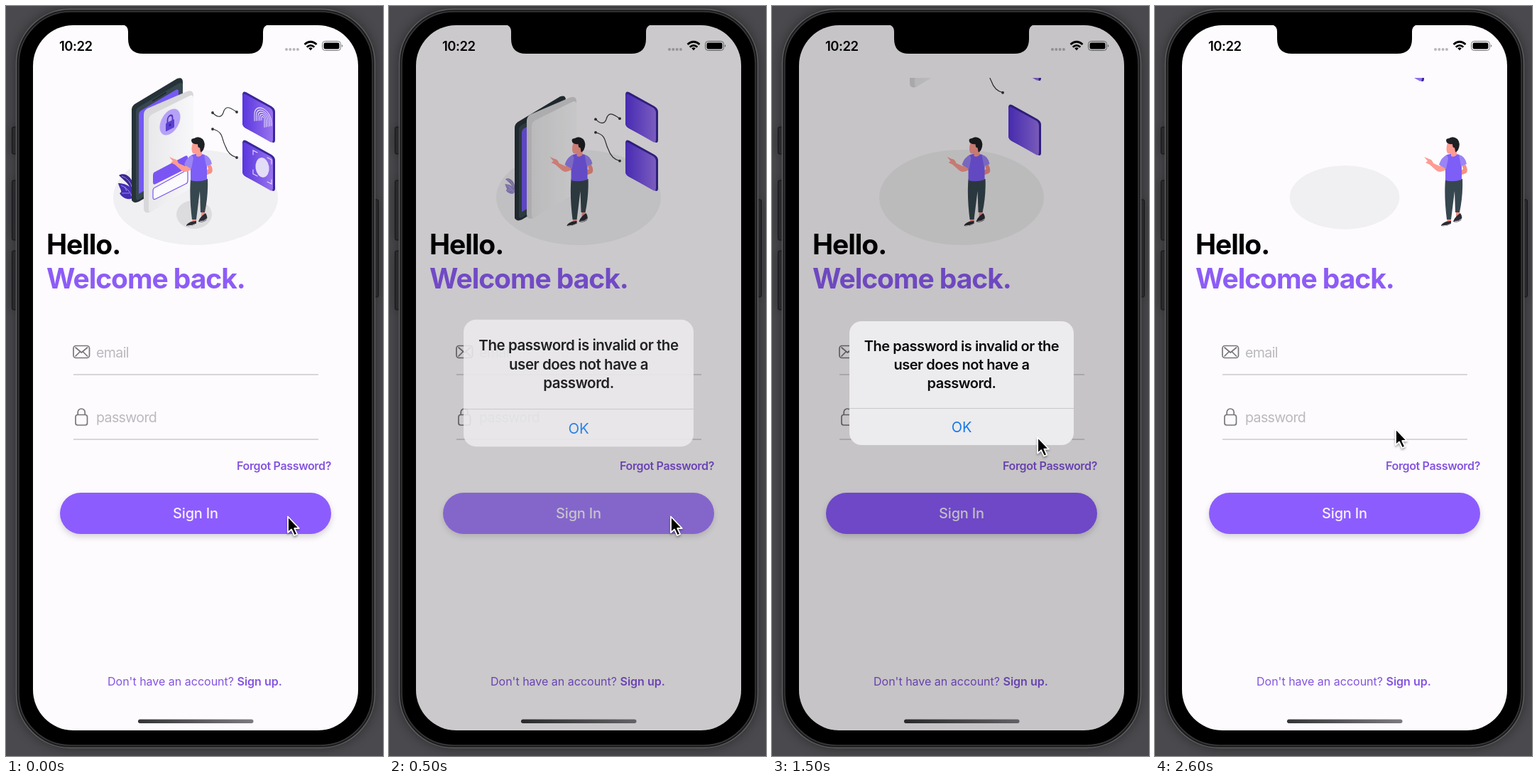
Write an HTML page that moves like this. It is 531x1054 px and loops after 2.7 s.

```html
<!DOCTYPE html>
<html lang="en">
<head>
<meta charset="utf-8">
<title>Sign in</title>
<style>
html, body { margin: 0; width: 100%; height: 100%; overflow: hidden; background: #4a494d; }
svg { display: block; width: 100vw; height: 100vh; }
text { font-family: Inter, Roboto, sans-serif; }
.mid { text-anchor: middle; }
.title { font-size: 39px; font-weight: 700; letter-spacing: -1.05px; }
.hint { font-size: 19.6px; letter-spacing: -.65px; fill: #bbb9be; }
.small { font-size: 16px; fill: #8454df; }
.bold { font-weight: 600; }
.msg { font-size: 20px; font-weight: 600; letter-spacing: -.45px; fill: #0b0b0d; }
.icon { fill: none; stroke: #77767b; stroke-width: 1.7; stroke-linejoin: round; stroke-linecap: round; }
.rule { stroke: #b3b1b6; }
.wire { fill: none; stroke: #34343c; stroke-width: 1.2; }
#body { filter: drop-shadow(0 0 8px rgba(0, 0, 0, .4)); }
#button { filter: drop-shadow(0 4px 4px rgba(0, 0, 0, .16)); }
#cursor { filter: drop-shadow(0 2px 1.5px rgba(0, 0, 0, .35)); }
</style>
</head>
<body>
<svg viewBox="0 0 531 1054" preserveAspectRatio="none">
  <defs>
    <linearGradient id="violet">
      <stop offset="0" stop-color="#5936df"/><stop offset="1" stop-color="#9973ee"/>
    </linearGradient>
    <linearGradient id="glass">
      <stop offset="0" stop-color="#e9e8ea"/><stop offset="1" stop-color="#f8f7f9"/>
    </linearGradient>
    <linearGradient id="bar">
      <stop offset="0" stop-color="#343336"/><stop offset="1" stop-color="#7c7a7f"/>
    </linearGradient>
    <clipPath id="screen"><rect x="38" y="27" width="458" height="991" rx="57"/></clipPath>
    <clipPath id="view"><rect x="38" y="101" width="458" height="240"/></clipPath>
    <g id="card">
      <path fill="#3a279c" d="M333 125Q333 119 338 121L374 141Q379 144 379 149V188Q379 194 374 191L338 172Q333 169 333 164z"/>
      <path fill="url(#violet)" d="M333 127Q333 122 337 124L372 143Q376 146 376 150V187Q376 193 372 191L337 171Q333 169 333 165z"/>
    </g>
  </defs>

  <g id="body">
    <g fill="#29292b" stroke="#151516">
      <rect x="8.5" y="170" width="9" height="38" rx="2"/>
      <rect x="8.5" y="245" width="9" height="84" rx="2"/>
      <rect x="8.5" y="344" width="9" height="83" rx="2"/>
      <rect x="516" y="272" width="8.5" height="137" rx="2"/>
    </g>
    <rect x="14.5" y="4.5" width="505" height="1038" rx="76" fill="#1c1c1d" stroke="#5e5d61" stroke-width="1.5"/>
  </g>
  <rect x="18" y="8" width="498" height="1031" rx="73" stroke="#39393b" stroke-width="1.5"/>

  <g clip-path="url(#screen)">
    <rect x="38" y="27" width="458" height="991" fill="#fdfbfe"/>

    <g clip-path="url(#view)">
      <ellipse id="floor" cx="267" cy="269" rx="116" ry="67" fill="#f0eff1"/>
      <ellipse id="shade" cx="265" cy="293" rx="25" ry="20" fill="#dcdbde"/>

      <g id="plant">
        <path fill="#3a2891" d="M159 238C168 232 182 243 181 262L176 263C176 251 168 247 159 238z"/>
        <path fill="#452db5" d="M158 249C164 249 179 251 180 266C180 274 165 273 160 263C165 261 160 257 158 249z"/>
        <path fill="none" stroke="#a796f2" stroke-width=".9" d="M163 239Q175 243 178 257M162 252Q174 257 178 269M163 263L174 263M167 254L170 260"/>
      </g>

      <g id="phone">
        <path fill="#263238" d="M177 146Q177 141 181 138L241 102Q249 99 249 107V235Q249 239 245 241L187 275Q180 278 177 273z"/>
        <path fill="#37474f" d="M183 149Q183 144 187 142L243 109Q249 106 249 111V235L187 272Q183 274 183 269z"/>
        <path fill="#7559f4" d="M187 153Q187 149 190 147L239 118Q243 116 243 120V232L187 264z"/>
        <path stroke="#222c31" stroke-width="2.2" stroke-linecap="round" d="M207 133L225 122"/>
      </g>

      <g id="panel">
        <path fill="#d8d7d9" d="M194 153Q194 147 199 144L255 120Q264 117 264 126V252L202 290Q194 292 194 284z"/>
        <path fill="url(#glass)" d="M201 160Q201 155 206 152L259 126Q264 124 264 130V250Q264 254 260 256L206 288Q201 291 201 286z"/>
      </g>
      <path id="fill" fill="#7b55f3" d="M207 238Q207 234 210 233L252 211Q256 209 256 213V224Q256 228 253 229L211 250Q207 252 207 248z"/>
      <path id="line" fill="#fbfafc" stroke="#7b55f3" stroke-width="1.2" d="M207 260Q207 256 210 255L252 232Q256 230 256 234V245Q256 249 253 250L211 271Q207 273 207 269z"/>
      <g id="lock">
        <g transform="translate(231 163) skewY(-27) scale(1 1.17)">
          <circle r="14.5" fill="#b6a1f8"/>
          <path fill="none" stroke="#4e35b8" stroke-width="1.8" d="M-3.500 0V-4a3.500 3.800 0 0 1 7 0V0"/>
          <rect x="-6" y="-1" width="12" height="10" rx="1" fill="#5a3fd0"/>
          <circle cy="3.5" r="1.4" fill="#34218b"/>
        </g>
      </g>

      <g id="wireA">
        <path class="wire" d="M291 150C297 156 303 158 306 150C309 139 315 142 325 149"/>
        <circle cx="291" cy="150" r="1.9" fill="#34343c"/><circle cx="325" cy="149" r="1.9" fill="#34343c"/>
      </g>
      <g id="wireB">
        <path class="wire" d="M291 173C307 177 303 186 309 197C312 206 317 211 325 213"/>
        <circle cx="291" cy="173" r="1.9" fill="#34343c"/><circle cx="325" cy="213" r="1.9" fill="#34343c"/>
      </g>

      <use id="cardA" href="#card"/>
      <g id="cardB"><use href="#card" y="68"/></g>
      <g id="marks" fill="none" stroke="#e4dbfd" stroke-width="1.1" stroke-linecap="round">
        <g transform="translate(362 158) skewY(26) scale(1 1.15)" id="print"></g>
        <path d="M348 209V203L354 206M368 213L374 216V222M348 230V236L354 239M368 247L374 250V244"/>
        <ellipse cx="361" cy="227" rx="9.5" ry="14" fill="#e3dcf7" stroke="none" transform="rotate(-8 361 227)"/>
      </g>

      <g id="person">
        <path fill="#f58f86" d="M285 218Q294 230 289 235L281 238L280 233L285 229L282 220z"/>
        <path fill="#f58f86" d="M263 297H268V304H262zM275 287H280V297H275z"/>
        <path fill="#37474f" d="M260 243H284Q285 266 280 290H274L273 260L268 300H262Q258 268 260 243z"/>
        <path fill="#2c2c35" d="M261 303L268 302V306Q262 310 254 309Q254 306 261 303zM276 295L281 291Q285 297 282 301Q277 305 271 303Q272 299 276 295z"/>
        <path stroke="#d9d7dc" fill="none" d="M255 309Q263 309 268 306M273 303Q279 303 283 299"/>
        <path fill="#fd9c92" d="M259 218L264 228Q253 236 247 231L238 223L232 220L235 218L230 212L237 215Q241 215 243 221L252 225z"/>
        <path fill="#7d5ef7" d="M262 209Q271 206 280 209L283 222V244Q271 248 260 245V222z"/>
        <path fill="#9a84f6" d="M262 209Q254 213 251 223L261 229L264 214zM279 209Q288 211 290 222L282 225z"/>
        <path fill="#fd9c92" d="M263 192Q260 202 263 207L268 208V211Q273 213 276 209V194z"/>
        <path fill="#1f2024" d="M262 192Q259 186 265 186Q271 182 277 187Q282 193 278 202Q276 206 274 205L273 199Q270 200 270 194Q266 195 262 192z"/>
      </g>
    </g>

    <text class="title" x="57" y="349">Hello.</text>
    <text class="title" x="57" y="397" fill="#8d5cf6">Welcome back.</text>

    <g class="icon">
      <rect x="95" y="477.5" width="22.5" height="17" rx="3.5"/>
      <path d="M98 480L106.300 487L114.600 480M98 492L103.500 486.500M114.600 492L109 486.500"/>
      <rect x="98" y="574.5" width="16.5" height="14.5" rx="3"/>
      <path d="M101.200 574V571a5 5 0 0 1 10 0V574"/>
    </g>
    <text class="hint" x="127" y="494">email</text>
    <text class="hint" x="127" y="585">password</text>
    <path class="rule" d="M95 518H440M95 609H440"/>
    <text class="small bold" x="458" y="652" text-anchor="end" letter-spacing="-.35">Forgot Password?</text>

    <g id="button">
      <rect x="76" y="684" width="382" height="58" rx="29" fill="#8d5cff"/>
      <text class="mid" x="267" y="720" font-size="20" font-weight="500" letter-spacing="-.2" fill="#f6f1fd">Sign In</text>
    </g>
    <text class="small" x="143" y="955">Don't have an account? <tspan class="bold">Sign up.</tspan></text>

    <text class="bold" x="75" y="63" font-size="18.5" letter-spacing="-.5">10:22</text>
    <g fill="#b9b7bc">
      <circle cx="395" cy="61" r="2"/><circle cx="400.3" cy="61" r="2"/>
      <circle cx="405.6" cy="61" r="2"/><circle cx="410.9" cy="61" r="2"/>
    </g>
    <g fill="none" stroke="#000" stroke-width="2.8">
      <path d="M420.500 54Q429 46.500 437.500 54M423.700 57.700Q429 53 434.300 57.700"/>
      <path d="M426.200 59.300Q429 57 431.800 59.300L429 62.500z" fill="#000" stroke="none"/>
    </g>
    <rect x="445.5" y="49.5" width="26" height="13" rx="4" fill="none" stroke="#77757a"/>
    <rect x="447.5" y="51.5" width="22" height="9" rx="2.3"/>
    <path d="M473 54Q475.500 56 473 58z" fill="#77757a"/>
    <rect x="186" y="1002.5" width="162.5" height="5.5" rx="2.7" fill="url(#bar)"/>

    <rect id="dim" x="38" y="27" width="458" height="991"/>

    <g id="alert">
      <rect x="109" y="443" width="316" height="174" rx="17" fill="#ecebed"/>
      <path stroke="#c9c7ca" d="M109 565.500H425"/>
      <g class="mid">
        <text class="msg" x="267" y="485">The password is invalid or the</text>
        <text class="msg" x="267" y="511">user does not have a</text>
        <text class="msg" x="267" y="537">password.</text>
        <text x="267" y="599" font-size="20" letter-spacing="-.2" fill="#167aeb">OK</text>
      </g>
    </g>
  </g>

  <path d="M163 26Q172 27 172 36V46Q172 67 193 67H341Q362 67 362 46V36Q362 27 371 26z"/>
  <path id="cursor" d="M0 0V22.500L5 18L9 26.500L13 24.700L9.200 16.500H15.800z" stroke="#fff" stroke-width="1.8" stroke-linejoin="round"/>
</svg>
<script>
const LOOP = 2700, STEP = 100;
const $ = id => document.getElementById(id);

const ramp = (t, from, to) => Math.min(1, Math.max(0, (t - from) / (to - from)));
const backIn = u => u * u * (2.7 * u - 1.7);
const easeOut = u => 1 - (1 - u) ** 3;
const smooth = u => u * u * (3 - 2 * u);

const fade = (id, v) => $(id).setAttribute("opacity", v);
const move = (id, x, y) => $(id).setAttribute("transform", `translate(${x} ${y})`);
const scale = (id, x, y, s) =>
  $(id).setAttribute("transform", `translate(${x} ${y}) scale(${s}) translate(${-x} ${-y})`);

// Parts wind up, slide out of view, then vanish shortly after arriving.
function leave(id, t, start, time, dx, dy) {
  const k = backIn(ramp(t, start, start + time));
  move(id, dx * k, dy * k);
  fade(id, t < start + time + 250 ? 1 : 0);
}

// Details drift off the panel while fading.
function drift(id, t, dy) {
  const k = ramp(t, 0, 400) ** 2;
  move(id, 0, dy * k);
  fade(id, 1 - k);
}

// The last part of the loop begins to bring the scene back.
function enter(id, t, x, y, vx, vy) {
  const left = 2600 - t;
  move(id, x + vx * left, y + vy * left);
  fade(id, 1);
}

function drawScene(t) {
  drift("lock", t, -46);
  drift("fill", t, 69);
  drift("line", t, 53);
  fade("marks", 1 - ramp(t, 0, 300));

  const wilt = ramp(t, 0, 600);
  scale("plant", 172, 252, 1 - backIn(wilt));
  fade("plant", 1 - wilt ** 4);
  const shrink = ramp(t, 200, 500);
  scale("shade", 265, 298, 1 - shrink / 2);
  fade("shade", 1 - shrink);

  leave("phone", t, 50, 1180, 0, -260);
  leave("panel", t, 280, 1080, 0, -176);
  leave("wireA", t, 300, 940, 0, -180);
  leave("wireB", t, 300, 1350, 0, -165);
  leave("cardA", t, 500, 1000, 0, -87);
  leave("cardB", t, 480, 1230, 0, -135);
  leave("person", t, 300, 1720, 185, 0);
  if (t > 2400) {
    enter("person", t, 149, 0, .22, 0);
    enter("cardB", t, 0, -154, 0, -.11);
  }
  scale("floor", 267, 269, t < 2300 ? 1 - ramp(t, 1650, 2250) ** 2 : ramp(t, 2300, 2750));
}

function drawDialog(t) {
  const closing = ramp(t, 2000, 2350);
  fade("button", 1 - .78 * (ramp(t, 0, 200) - ramp(t, 300, 580)));
  fade("dim", .22 * (ramp(t, 300, 520) - closing));
  fade("alert", ramp(t, 280, 530) - closing);
  scale("alert", 267, 530, 1.2 - .2 * easeOut(ramp(t, 300, 700)));
  move("cursor", 397 - 58 * smooth(ramp(t, 1200, 1900)), 717.5 - 123 * easeOut(ramp(t, 1200, 1750)));
}

// Fingerprint ridges
let ridges = "";
for (let r = 2; r <= 12; r += 2.5) {
  ridges += `<path d="M${-r} ${r * .5 + 2}V0A${r} ${r} 0 0 1 ${r} 0V${11 - r * .6}"/>`;
}
$("print").innerHTML = ridges;

function tick() {
  const t = Math.floor(performance.now() % LOOP / STEP) * STEP;
  drawScene(t);
  drawDialog(t);
  requestAnimationFrame(tick);
}
tick();
</script>
</body>
</html>
```
